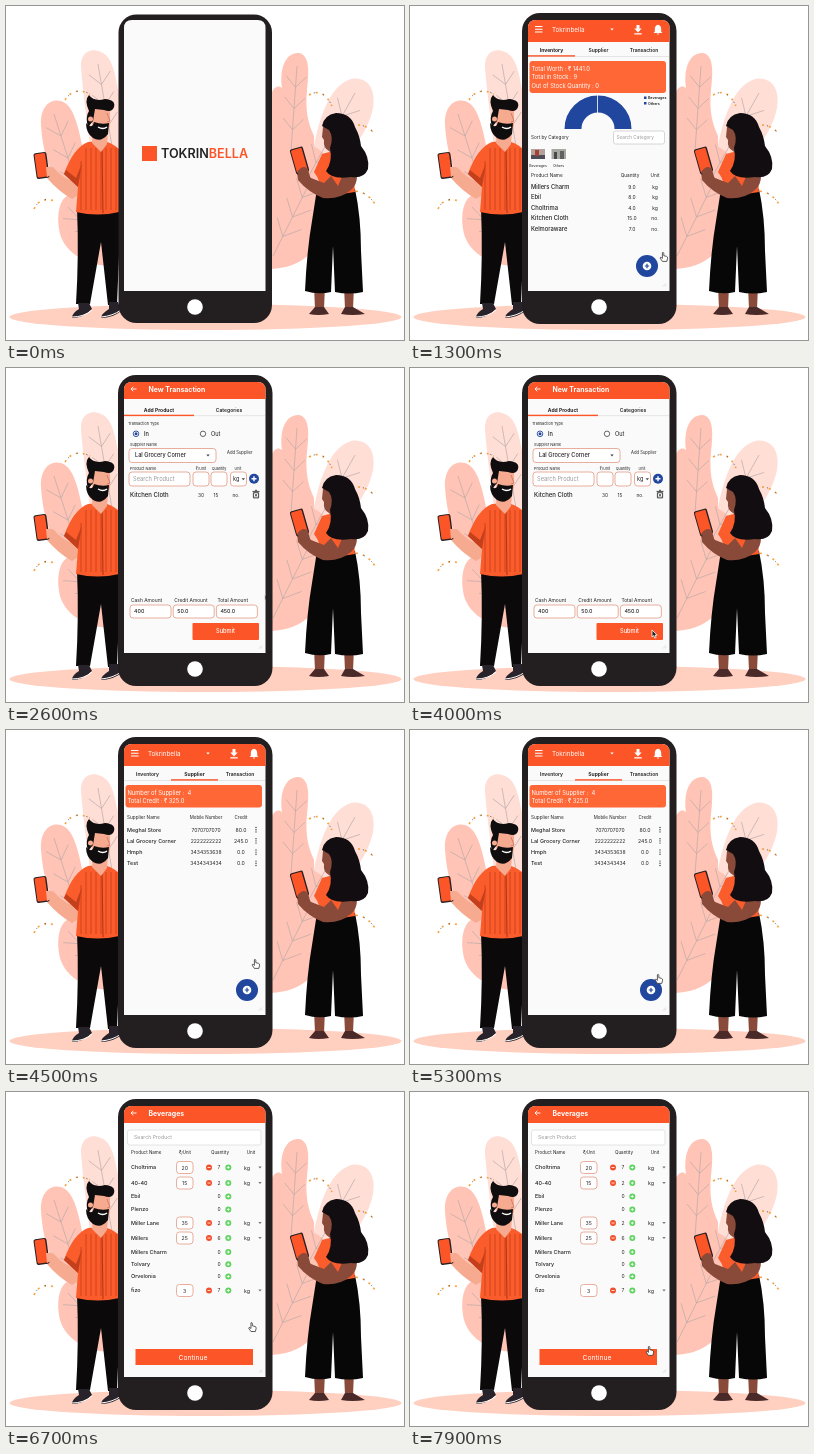
Animation, 398 px wide and 334 px high, one loop 8 s. Source, as an HTML page:

```html
<!DOCTYPE html>
<html lang="en">
<head>
<meta charset="utf-8">
<title>Shop app demo</title>
<style>
html, body { margin: 0; width: 100%; height: 100%; overflow: hidden; background: #fff; }
svg { display: block; width: 100%; height: 100%; }
text { font-family: Inter, "Noto Sans", sans-serif; }
</style>
</head>
<body>
<svg id="stage" viewBox="0 0 398 334"></svg>
<script>
const ORANGE = '#fc5527', BLUE = '#21469e', INK = '#222', GREY = '#999', LINE = '#d8d8d8';
const PINK = '#ffcfc0', PALE = '#ffded6', ROSE = '#ffc4b5', BODY = '#231f20';
const LOOP = 8000;

const text = (x, y, str, size, o = {}) =>
  `<text x="${x}" y="${y}" font-size="${size}" fill="${o.fill || INK}" font-weight="${o.w || 400}" text-anchor="${o.mid ? 'middle' : 'start'}">${str}</text>`;
const mid = (x, y, str, size, o) => text(x, y, str, size, { ...o, mid: true });
const rect = (x, y, w, h, fill, r = 0, stroke = 'none') =>
  `<rect x="${x}" y="${y}" width="${w}" height="${h}" rx="${r}" fill="${fill}" stroke="${stroke}" stroke-width=".8"/>`;
const circle = (x, y, r, fill, stroke = 'none') =>
  `<circle cx="${x}" cy="${y}" r="${r}" fill="${fill}" stroke="${stroke}" stroke-width=".9"/>`;
const shape = (d, fill) => `<path d="${d}" fill="${fill}"/>`;
const line = (d, color = INK, w = 1, extra = '') =>
  `<path d="${d}" fill="none" stroke="${color}" stroke-width="${w}" ${extra}/>`;
const caret = (x, y, color = '#444') => shape(`M${x - 1.7} ${y - 1}h3.4l-1.7 2z`, color);
const plus = (x, y, r, fill, s = r / 2) =>
  circle(x, y, r, fill) + line(`M${x - s} ${y}h${2 * s}M${x} ${y - s}v${2 * s}`, '#fff', r / 3.6);
const addButton = (x, y) =>
  circle(x, y, 11, BLUE) + circle(x, y, 4.3, '#fff') + line(`M${x - 2.2} ${y}h4.4M${x} ${y - 2.2}v4.4`, BLUE, 1.2);
const field = (x, y, w, h) => rect(x, y, w, h, '#fff', 3, '#e39a86');
const handset = (x, y, w, h, tilt) =>
  `<g transform="translate(${x} ${y}) rotate(${tilt})">${rect(-w / 2, -h / 2, w, h, '#2a2023', 2)}${rect(1 - w / 2, 1 - h / 2, w - 2.4, h - 2.4, ORANGE, 1.4)}</g>`;

// Stem with paired side veins
function veins(x1, y1, x2, y2, n, len) {
  let d = `M${x1} ${y1}L${x2} ${y2}`;
  const a = Math.atan2(y2 - y1, x2 - x1);
  for (let i = 1; i <= n; i++) {
    const k = i / (n + 1), x = x1 + (x2 - x1) * k, y = y1 + (y2 - y1) * k;
    for (const side of [-.75, .75])
      d += `M${x} ${y}l${len * Math.cos(a + side)} ${len * Math.sin(a + side)}`;
  }
  return line(d, '#b9aaa9', .7);
}

const sparkle = d =>
  line(d, '#f6a23b', 1.6, 'stroke-dasharray="2 5"') + line(d, '#37466e', 1, 'stroke-dasharray="1 9" stroke-dashoffset="5"');

function leaves() {
  return shape('M75 62C74 47 84 41 95 46C107 51 109 68 113 88V180H88C85 140 78 100 75 62Z', PALE) +
    shape('M62 190C47 178 37 151 35 119C34 102 43 92 55 95C68 99 72 120 77 143L90 200Z', ROSE) +
    shape('M54 228C49 207 55 190 64 189L113 195V259C91 263 61 252 54 228Z', ROSE) +
    veins(106, 140, 92, 58, 3, 16) + veins(76, 196, 48, 108, 3, 17) + veins(110, 252, 62, 201, 3, 17) +
    shape('M306 150C312 116 322 80 345 73C363 70 370 85 367 102C362 127 345 145 330 162Z', PALE) +
    shape('M265 88C268 80 273 79 276 82C273 60 281 46 293 47C304 49 303 67 301 84C299 104 302 117 308 130V200H265Z', ROSE) +
    shape('M265 160C285 130 310 132 326 158C316 174 311 196 315 214C319 244 294 262 265 263Z', ROSE) +
    veins(285, 145, 291, 60, 3, 15) + veins(297, 180, 349, 87, 3, 19) + veins(267, 250, 306, 172, 3, 20) +
    sparkle('M59 94Q68 80 84 88') + sparkle('M28 203Q34 190 49 195') +
    sparkle('M303 89Q317 81 326 100') + sparkle('M343 186Q358 182 369 198') + sparkle('M352 119Q361 119 369 128');
}

function man() {
  const skin = '#f6ab91';
  let stripes = '';
  for (let x = 75; x < 112; x += 5) stripes += `M${x} ${x < 80 ? 155 : 142}L${x} 204`;
  return shape('M71 202H113V250L111 299H102L95 236L84 298H70Q73 249 71 202Z', '#0b090a') +
    shape('M72 297L83 297L86 303Q77 312 66 312Q66 307 73 303Z', '#28232b') +
    shape('M103 296L112 296L115 305Q107 312 95 312Q95 308 103 303Z', '#28232b') +
    line('M66 311Q78 311 86 304M95 311Q107 310 115 304', '#fff', 1) +
    shape('M41 165L47 161Q55 170 63 174L75 172L77 186L66 193Q52 185 41 172Z', skin) +
    shape('M82 136Q67 142 58 168L72 181L70 206Q92 211 113 206V143Q105 136 97 135Z', '#fa5c2b') +
    shape('M58 168L72 181L76 157L70 172L60 164Z', '#c43f1c') +
    line(stripes, '#c63d1b', .8) + line('M96 140L97 207', '#a52f14', .9) +
    shape('M87 119L102 127L101 138L95 146L86 137Z', skin) +
    shape('M84 101Q95 96 104 102L104 120Q99 130 87 123Z', skin) +
    shape('M80 117Q86 124 88 116Q96 119 103 117L102 128Q95 137 87 132Q80 127 80 117Z', '#100d0e') +
    shape('M82 121Q79 111 83 105Q78 94 83 89Q88 96 99 93Q110 94 108 101Q106 107 98 104L89 103L87 115Z', '#100d0e') +
    line('M92 121Q97 124 101 121', '#fff', 1.4) + circle(84.5, 113, 2.5, skin) + line('M101 107L104 115L101 116', '#c46c58', .7) +
    handset(35.5, 159.5, 13, 26, -8) +
    shape('M40 161L46 161L47 168L41 171Z', skin);
}

function woman() {
  const skin = '#894a3a';
  return shape('M308 280H319L318 303H309ZM338 280H348L347 303H339Z', skin) +
    shape('M309 301H318L323 308Q312 310 303 308ZM339 301H347L359 308Q346 310 335 308Z', '#4a2a29') +
    shape('M311 183H349Q355 211 355 245L357 286Q343 289 329 286L327 240L325 286Q312 289 299 285Q301 243 306 215Z', '#080708') +
    shape('M316 148Q331 142 346 150L349 186Q329 190 313 186Q316 176 308 166Z', '#fa5c2b') +
    shape('M291 166L298 162L305 172L318 177L325 170L332 180L317 192Q302 186 292 174Z', skin) +
    shape('M338 166L351 170Q351 179 345 184Q333 194 317 192L313 184L332 180Z', skin) +
    shape('M317 121L326 118L332 149Q327 150 323 145Q317 142 318 134L316 131Z', skin) +
    shape('M316 120Q318 109 330 107Q345 107 349 121Q354 130 355 140Q364 151 362 163Q358 173 345 171Q326 174 320 165Q327 155 324 142Q328 131 323 124Z', '#120d11') +
    handset(293.5, 154.5, 13.5, 26, -16) +
    shape('M291 166Q297 158 302 163L304 171L295 172Z', skin);
}

const screenPath = 'M118 285V22Q118 14 126 14H251.5Q259.5 14 259.5 22V285Z';
const phone = rect(112.5, 8.5, 153.5, 308.5, BODY, 18) + shape(screenPath, '#fafafa') + circle(189, 301, 7.8, '#fff');
const appPhone = rect(112, 7, 154.5, 311, BODY, 18) + shape(screenPath, '#fafafa') + circle(189, 301, 7.8, '#fff');

const bar = h => shape(`M118 ${h}V22Q118 14 126 14H251.5Q259.5 14 259.5 22V${h}Z`, ORANGE);

function tabs(names, edges, y, active) {
  let s = rect(118, y, 141, .6, LINE);
  names.forEach((n, i) => {
    const x = edges[i], w = edges[i + 1] - x;
    s += mid(x + w / 2, y - 3.6, n, 5, { w: i === active ? 700 : 600 });
    if (i === active) s += rect(x, y - .8, w, 1.4, ORANGE);
  });
  return s;
}

const home = active => bar(36) +
  line('M125 20.5h7.5M125 23.2h7.5M125 26h7.5', '#fff', 1.1) + text(142, 26, 'Tokrinbella', 6.3, { fill: '#fff' }) +
  caret(202, 23.6, '#fff') +
  shape('M226.5 19h3v3.5h2.2L228 26.4L224.3 22.5h2.2ZM224.3 27.2h7.4v1.2h-7.4Z', '#fff') +
  shape('M248 18.8Q251.2 19.5 251.2 23V25.8L252.5 27H243.5L244.8 25.8V23Q244.8 19.5 248 18.8ZM246.8 27.6h2.4L248 29Z', '#fff') +
  tabs(['Inventory', 'Supplier', 'Transaction'], [118, 165, 212, 256], 50, active);

const back = title => bar(31) + line('M130.5 21H125M127.3 18.7L125 21L127.3 23.3', '#fff', .9) +
  text(142.5, 23.6, title, 6.9, { fill: '#fff', w: 700 });

const panel = (h, rows) => rect(119.5, 55, 136.5, h, '#ff6737', 3) +
  rows.map((r, i) => text(121.5, 64.7 + i * 8.4, r, 5.8, { fill: '#fff' })).join('');

const resize = line('M253 280.5l3-3M255 280.5l1-1', '#bbb', .5);

function splash() {
  return phone + rect(136, 140, 15, 15, ORANGE) +
    `<text x="155" y="152.2" font-size="12.6" font-weight="600" fill="${INK}">TOKRIN<tspan fill="${ORANGE}">BELLA</tspan></text>`;
}

function inventory() {
  const rows = [['Millers Charm', '9.0', 'kg'], ['Ebil', '8.0', 'kg'], ['Choltrima', '4.0', 'kg'], ['Kitchen Cloth', '15.0', 'no.'], ['Kelmoraware', '7.0', 'no.']];
  return appPhone + home(0) + panel(32, ['Total Worth : ₹ 1441.0', 'Total in Stock : 9', 'Out of Stock Quantity : 0']) +
    line('M163 123A25 25 0 0 1 213 123', BLUE, 17) + line('M187.5 89V107', '#fff', .8) +
    rect(234, 90.5, 2.5, 2.5, BLUE) + text(238, 93, 'Beverages', 3.6, { w: 600 }) +
    rect(234, 96, 2.5, 2.5, BLUE) + text(238, 98.5, 'Others', 3.6, { w: 600 }) +
    text(121, 132.5, 'Sort by Category', 4.7) + rect(203.5, 125, 51, 13, '#fff', 2, '#ccc') +
    text(206.5, 133, 'Search Category', 4.7, { fill: GREY }) +
    rect(121, 143, 14, 10, '#b5a19b') + rect(121, 149, 14, 4, '#4d4c58') + rect(125, 144, 4, 6, '#a54236') +
    rect(141.5, 143, 14.5, 10, '#a8a8a2') + rect(144, 146, 3, 7, '#49484a') + rect(150, 145, 4, 8, '#5f6260') +
    mid(128, 161, 'Beverages', 3.5) + mid(148.5, 161, 'Others', 3.5) +
    text(121, 171, 'Product Name', 4.7) + mid(220, 171, 'Quantity', 4.7) + mid(245, 171, 'Unit', 4.7) +
    rows.map(([name, qty, unit], i) => {
      const y = 183 + i * 10.4;
      return text(121, y, name, 5.8, { w: 500 }) + mid(222, y, qty, 5) + mid(245, y, unit, 5);
    }).join('') +
    addButton(237, 260) + resize;
}

function transaction() {
  let s = appPhone + back('New Transaction') + tabs(['Add Product', 'Categories'], [118, 188, 258], 47.5, 0) +
    text(122, 56.5, 'Transaction Type', 3.8) +
    circle(130, 65.8, 2.8, '#fff', BLUE) + circle(130, 65.8, 1.5, BLUE) + text(138, 68, 'In', 5.6, { w: 500 }) +
    circle(197, 65.8, 2.7, '#fff', '#555') + text(205, 68, 'Out', 5.6) +
    text(124, 78, 'Supplier Name', 3.9) + field(123, 80.5, 87, 14) + text(129, 89.4, 'Lal Grocery Corner', 5.6, { w: 500 }) +
    caret(202, 87.5) + text(221, 85.8, 'Add Supplier', 4.2) +
    text(124, 101.5, 'Product Name', 3.9) + mid(195, 101.5, '₹/Unit', 3.7) + mid(213, 101.5, 'Quantity', 3.7) + mid(232, 101.5, 'Unit', 3.7) +
    field(123, 104, 61, 14) + text(127, 112.7, 'Search Product', 5.7, { fill: GREY }) +
    [187, 205, 224.5].map(x => field(x, 104, 16, 14)).join('') + text(227, 112.7, 'kg', 5.5) + caret(237.3, 111.2) +
    plus(248, 110.7, 5, BLUE) +
    text(124, 128.8, 'Kitchen Cloth', 6, { w: 500 }) + mid(195, 128.8, '30', 4.8) + mid(210, 128.8, '15', 4.8) + mid(230, 128.8, 'no.', 4.8) +
    line('M246.5 123.4h7M249 122.3h2M247.4 124.7h5.2v5.2h-5.2zM248.7 126l2.6 2.6M251.3 126l-2.6 2.6', '#333', .9);
  [['Cash', '400'], ['Credit', '50.0'], ['Total', '450.0']].forEach(([name, value], i) => {
    const x = 124 + i * 43.2;
    s += text(x + 1, 234.3, name + ' Amount', 4.9) + field(x, 237, 41, 13) + text(x + 4, 245.4, value, 5.3, { w: 500 });
  });
  return s + rect(186.5, 255, 66.5, 17, ORANGE, 1) + mid(219.5, 264.8, 'Submit', 5.7, { fill: '#fff', w: 500 }) + resize;
}

function supplier() {
  const rows = [['Meghal Store', '7070707070', '80.0'], ['Lal Grocery Corner', '2222222222', '245.0'], ['Hmph', '3434353638', '0.0'], ['Test', '3434343434', '0.0']];
  return appPhone + home(1) + panel(22.5, ['Number of Supplier :&#160; 4', 'Total Credit : ₹ 325.0']) +
    text(121, 88.5, 'Supplier Name', 4.7) + mid(200, 88.5, 'Mobile Number', 4.5) + mid(235, 88.5, 'Credit', 4.5) +
    rows.map(([name, tel, sum], i) => {
      const y = 101.5 + i * 11.2;
      return text(121, y, name, 5.4, { w: 500 }) + mid(200, y, tel, 5) + mid(235, y, sum, 5.2) +
        [-4, -1.8, .4].map(d => circle(250, y + d, .7, '#333')).join('');
    }).join('') +
    addButton(241, 260) + resize;
}

function beverages() {
  const rows = [['Choltrima', 7, 20, 75.5], ['40-40', 2, 15, 91], ['Ebil', 0, 0, 104.5], ['Plenzo', 0, 0, 117.5], ['Miller Lane', 2, 35, 131],
    ['Millers', 6, 25, 146], ['Millers Charm', 0, 0, 160], ['Tolvary', 0, 0, 172.3], ['Orvelonia', 0, 0, 184.5], ['fizo', 7, 3, 198.5]];
  return appPhone + back('Beverages') + rect(121.5, 38, 133.5, 15, '#fff', 2, '#ddd') + text(128, 47.2, 'Search Product', 5.2, { fill: GREY }) +
    text(125, 62, 'Product Name', 4.5) + mid(179, 62, '₹/Unit', 4.3) + mid(214, 62, 'Quantity', 4.5) + mid(245, 62, 'Unit', 4.5) +
    rows.map(([name, qty, price, y]) =>
      text(125, y + 1.9, name, 5.4, { w: 500 }) + mid(213, y + 1.9, qty, 5) + plus(222.3, y, 3, '#5fd35f') +
      (price ? field(170.5, y - 6, 16.5, 12) + mid(178.7, y + 2, price, 5.2) +
        circle(203, y, 3, '#f0502c') + line(`M201.5 ${y}h3`, '#fff', .8) + text(238, y + 2.2, 'kg', 5.3) + caret(254, y, '#777') : '')
    ).join('') +
    rect(129.5, 257, 117.5, 16, ORANGE) + mid(187, 267.7, 'Continue', 6.8, { fill: '#fff' }) + resize;
}

const HAND = '<path d="M-1.6 -4.3q1.2 -.7 1.4 .6v2.4l2.8 .7q1.2 .5 1 1.8l-.8 3.2h-4.4l-2.3 -3.3q0 -1.2 1.4 -.5l.9 .8z" fill="#fff" stroke="#333" stroke-width=".8"/>';
const ARROW = '<path d="M-2 -4v7l1.7 -1.5l1.1 2.6l1.3 -.6l-1.1 -2.4h2.2z" fill="#222" stroke="#fff" stroke-width=".8"/>';

// Start time, content, pointer and its path as [ms, x, y]
const screens = [
  { at: 0, draw: splash },
  { at: 400, draw: inventory, icon: HAND, path: [[800, 257, 228], [1300, 254, 251], [1700, 248, 261]] },
  { at: 2400, draw: transaction, icon: ARROW, path: [[2600, 260.5, 230], [3500, 244, 266]] },
  { at: 4300, draw: supplier, icon: HAND, path: [[4400, 250, 230], [4500, 250, 234], [5300, 249, 249], [6200, 248, 261]] },
  { at: 6400, draw: beverages, icon: HAND, path: [[6400, 247, 230], [7100, 246, 242], [7900, 240, 259]] },
];

const stage = document.getElementById('stage');
stage.innerHTML = `<clipPath id="glass"><path d="${screenPath}"/></clipPath>` +
  `<ellipse cx="199.5" cy="311" rx="196" ry="13" fill="${PINK}"/>` + leaves() + man() + woman() +
  screens.map(s => `<g class="screen">${s.draw()}<g clip-path="url(#glass)"><g class="pointer">${s.icon || ''}</g></g></g>`).join('');
const groups = [...stage.querySelectorAll('.screen')];

function along(path, t) {
  if (t <= path[0][0]) return path[0].slice(1);
  for (let i = 1; i < path.length; i++) {
    const [t0, x0, y0] = path[i - 1], [t1, x1, y1] = path[i];
    if (t <= t1) {
      const k = (t - t0) / (t1 - t0);
      return [x0 + (x1 - x0) * k, y0 + (y1 - y0) * k];
    }
  }
  return path[path.length - 1].slice(1);
}

function render(ms) {
  const t = Math.floor((ms % LOOP) / 100) * 100;
  const now = screens.filter(s => s.at <= t).length - 1;
  groups.forEach((g, i) => g.setAttribute('display', i === now ? 'inline' : 'none'));
  const { path } = screens[now];
  if (path) groups[now].querySelector('.pointer').setAttribute('transform', `translate(${along(path, t)})`);
}

const start = performance.now();
function tick() {
  render(performance.now() - start);
  requestAnimationFrame(tick);
}
tick();
</script>
</body>
</html>
```
